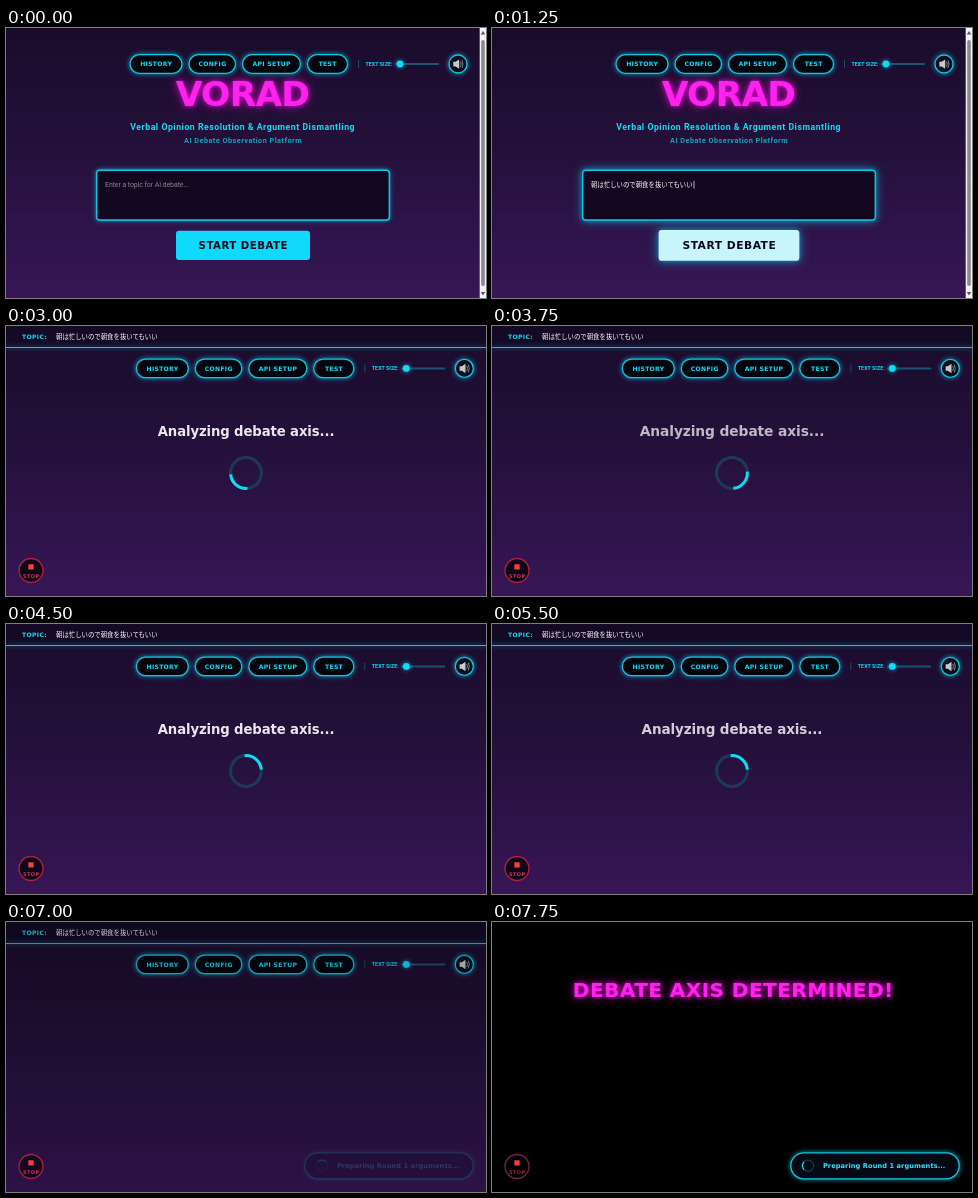
Recreate the animation shown at these times as an HTML page. Size 480 by 270 pixels, loop 8000 ms.

```html
<!DOCTYPE html>
<html lang="en">
<head>
<meta charset="utf-8">
<title>Debate</title>
<style>
html, body { margin: 0; width: 100%; height: 100%; overflow: hidden; background: #000; }
svg { display: block; width: 100vw; height: 100vh; }
text { white-space: pre; }
.wide { font-family: "DejaVu Sans", sans-serif; font-weight: 700; }
.body { font-family: Roboto, sans-serif; }
.cjk { font-family: "Noto Sans CJK JP", "Noto Sans CJK", sans-serif; font-size: 6.4px; font-weight: 500; fill: #fff; }
.mid { text-anchor: middle; }
.glow { filter: drop-shadow(0 0 2.5px rgba(0, 215, 245, .75)); }
.pink { fill: #ff22ee; filter: drop-shadow(0 0 2px rgba(255, 0, 230, .7)) drop-shadow(0 0 5px rgba(255, 0, 230, .5)); }
</style>
</head>
<body>
<svg id="stage" viewBox="0 0 480 270" preserveAspectRatio="none"></svg>
<script>
const LOOP = 8000;
const CYAN = '#10dcf6', EDGE = '#12c6de';
const TOPIC = '朝は忙しいので朝食を抜いてもいい';
const SWITCH = 1500, SPIN_FROM = 1390, REVEAL = 6840;

const label = (x, y, size, str, cls, extra = '') =>
  `<text x="${x}" y="${y}" font-size="${size}" class="${cls}" ${extra}>${str}</text>`;

const pill = (x, w, str) =>
  `<rect x="${x}" y="26.7" width="${w}" height="18.6" rx="9.3" fill="#04050d" stroke="${EDGE}" stroke-width="1.3" class="glow"/>` +
  label(x + w / 2 + .2, 38.2, 6.1, str, 'wide mid', `fill="${CYAN}" letter-spacing=".3"`);

// Quarter ring with its middle pointing right
const spinner = (id, x, y, r, width, track) => {
  const k = r * Math.SQRT1_2;
  return `<g transform="translate(${x} ${y})" fill="none" stroke-width="${width}">
    <circle r="${r}" stroke="${track}"/>
    <path id="${id}" d="M${k} ${-k}A${r} ${r} 0 0 1 ${k} ${k}" stroke="${CYAN}"/></g>`;
};

const toolbar = `
  ${pill(124, 52, 'HISTORY')}${pill(183, 46.5, 'CONFIG')}${pill(236.5, 58, 'API SETUP')}${pill(301.5, 40, 'TEST')}
  <path d="M352.5 32V40" stroke="#1c5a74" stroke-width=".8"/>
  ${label(359.5, 38, 5.2, 'TEXT SIZE:', 'body', `fill="${CYAN}" font-weight="700" letter-spacing=".1"`)}
  <path d="M390 36H432" stroke="#1a5470" stroke-width="2" stroke-linecap="round"/>
  <circle cx="394" cy="36" r="3.4" fill="${CYAN}" class="glow"/>
  <circle cx="452" cy="36" r="9" fill="#0a0a18" stroke="${EDGE}" stroke-width="1.3" class="glow"/>
  <path d="M447.3 33.8H449.5L453.2 31.4V40.8L449.5 38.4H447.3Z" fill="#c4cad2"/>
  <path d="M454.4 33.5Q456 36 454.4 38.7M456 32.2Q458 36 456 40" fill="none" stroke="#8a949e" stroke-width=".9"/>`;

const home = `<g id="home">
  ${label(236.5, 77.5, 34.5, 'VORAD', 'wide mid pink', 'letter-spacing="-.8"')}
  ${label(236.7, 101.7, 8.7, 'Verbal Opinion Resolution &amp; Argument Dismantling', 'body mid', `fill="${CYAN}" font-weight="700" letter-spacing=".53"`)}
  ${label(237, 115.2, 7.3, 'AI Debate Observation Platform', 'body mid', 'fill="#1a9fb8" font-weight="700" letter-spacing=".46"')}
  <rect id="box" x="90.7" y="142.2" width="292.6" height="49.8" rx="3" fill="#12081f" stroke="${EDGE}" stroke-width="1.4"/>
  ${label(99, 159, 7, 'Enter a topic for AI debate...', 'body', 'id="hint" fill="#89848f" letter-spacing="-.09"')}
  <text id="typed" x="99" y="159" class="cjk"></text>
  <path id="caret" d="M0 153V160.5" stroke="#fff" stroke-width=".7"/>
  <g id="start">
    <rect x="-67" y="-14.7" width="134" height="29.4" rx="3"/>
    ${label(.3, 3.7, 10.2, 'START DEBATE', 'wide mid', 'fill="#0a0a1c" letter-spacing=".5"')}
  </g>
  ${toolbar}
  <rect x="473.7" width="6.3" height="270" fill="#f3f3f5"/>
  <rect x="475.2" y="12" width="3.6" height="246" rx="1.8" fill="#8b8b8f"/>
  <path d="M474.8 6.5L477 3L479.2 6.5ZM474.8 264L477 267.5L479.2 264Z" fill="#55555a"/>
</g>`;

const debate = `<g id="debate">
  <rect width="480" height="21.5" fill="#140a26"/>
  <path d="M0 21.5H480" stroke="${EDGE}" stroke-width="1.2" class="glow"/>
  ${label(16, 12.8, 6, 'TOPIC:', 'wide', `fill="${CYAN}" letter-spacing=".4"`)}
  <text x="50" y="13" class="cjk">${TOPIC}</text>
  <g transform="translate(6.3 6.4)">${toolbar}</g>
  <g id="wait">
    <g id="pulse">${label(0, 4.9, 13.2, 'Analyzing debate axis...', 'wide mid', 'fill="#eceaf0" letter-spacing="-.1"')}</g>
    ${spinner('arc', 240, 147, 15.4, 3, '#1c3a58')}
  </g>
  <rect id="shade" width="480" height="270"/>
  <g id="stop">
    <circle id="ring" cx="25" cy="244.5" r="12" fill="#10061a" stroke="#b3203f" stroke-width="1.3"/>
    <rect x="22.3" y="238.2" width="5.4" height="5.4" rx=".6" fill="#f2403a"/>
    ${label(25.2, 252.2, 5, 'STOP', 'wide mid', 'id="stopText" fill="#d8304a" letter-spacing=".4"')}
  </g>
  <g id="banner">${label(.2, 7.3, 20.2, 'DEBATE AXIS DETERMINED!', 'wide mid pink', 'letter-spacing=".35"')}</g>
  <g id="next">
    <rect x="298.8" y="230.8" width="168.4" height="26" rx="13" fill="#060814" stroke="${EDGE}" stroke-width="1.3" class="glow"/>
    ${spinner('arc2', 316, 243.8, 5.6, 1.2, '#153a4e')}
    ${label(392.2, 246.2, 6.6, 'Preparing Round 1 arguments...', 'wide mid', 'fill="#3fe2f6" letter-spacing=".1"')}
  </g>
</g>`;

document.getElementById('stage').innerHTML = `
  <defs><linearGradient id="night" x2="0" y2="1">
    <stop stop-color="#1a0b2b"/><stop offset=".4" stop-color="#231039"/>
    <stop offset=".7" stop-color="#2c1348"/><stop offset="1" stop-color="#371655"/>
  </linearGradient></defs>
  <rect width="480" height="270" fill="url(#night)"/>${home}${debate}`;

const el = {};
document.querySelectorAll('[id]').forEach(n => el[n.id] = n);
const set = (id, name, value) => el[id].setAttribute(name, value);
const show = (id, on) => set(id, 'display', on ? 'inline' : 'none');
const part = (t, a, b) => Math.min(1, Math.max(0, (t - a) / (b - a)));
const smooth = p => p * p * (3 - 2 * p);
const mix = (a, b, p) => a + (b - a) * p;
const halo = (r, a) => `drop-shadow(0 0 ${r / 2}px rgba(0,205,240,${a})) drop-shadow(0 0 ${r}px rgba(0,205,240,${a}))`;

function drawHome(t) {
  const count = Math.floor(part(t, 240, 1000) * TOPIC.length);
  el.typed.textContent = TOPIC.slice(0, count);
  show('hint', count === 0);
  show('caret', count > 0);
  set('caret', 'transform', `translate(${99.6 + count * 6.4} 0)`);

  const focus = smooth(part(t, 200, 500));
  el.box.style.filter = halo(mix(2.5, 5, focus), .5);

  const hover = smooth(part(t, 1000, 1230));
  set('start', 'transform', `translate(237 217.4) scale(${mix(1, 1.05, hover)})`);
  set('start', 'fill', `rgb(${mix(16, 200, hover)},${mix(218, 245, hover)},252)`);
  el.start.style.filter = hover ? halo(5 * hover, .5) : 'none';
}

function drawDebate(t) {
  const age = t - SPIN_FROM;
  const beat = (1 - Math.cos(age / 1500 * 2 * Math.PI)) / 2;
  set('pulse', 'transform', `translate(240 105) scale(${1 + .05 * beat})`);
  set('pulse', 'opacity', 1 - .24 * beat);
  set('arc', 'transform', `rotate(${-90 + age * .36})`);
  show('wait', t < REVEAL);

  const fade = part(t, REVEAL, REVEAL + 380) ** 2;
  set('shade', 'opacity', fade);
  set('ring', 'stroke', `rgb(${mix(179, 112, fade)},${mix(32, 36, fade)},${mix(63, 84, fade)})`);
  set('ring', 'fill-opacity', 1 - fade);
  set('stopText', 'opacity', 1 - .25 * fade);
  set('next', 'opacity', fade);
  set('arc2', 'transform', `rotate(${-90 + (t - 7000) * .36})`);

  const grow = smooth(part(t, 7020, 7420)), settle = smooth(part(t, 7420, 7740));
  set('banner', 'transform', `translate(241 67.5) scale(${mix(.5, 1.2, grow) - .2 * settle})`);
  set('banner', 'opacity', grow);
}

function draw(t) {
  const first = t < SWITCH;
  show('home', first);
  show('debate', !first);
  first ? drawHome(t) : drawDebate(t);
}

const begin = performance.now();
function tick() {
  draw((performance.now() - begin) % LOOP);
  requestAnimationFrame(tick);
}
draw(0);
requestAnimationFrame(tick);
</script>
</body>
</html>
```
